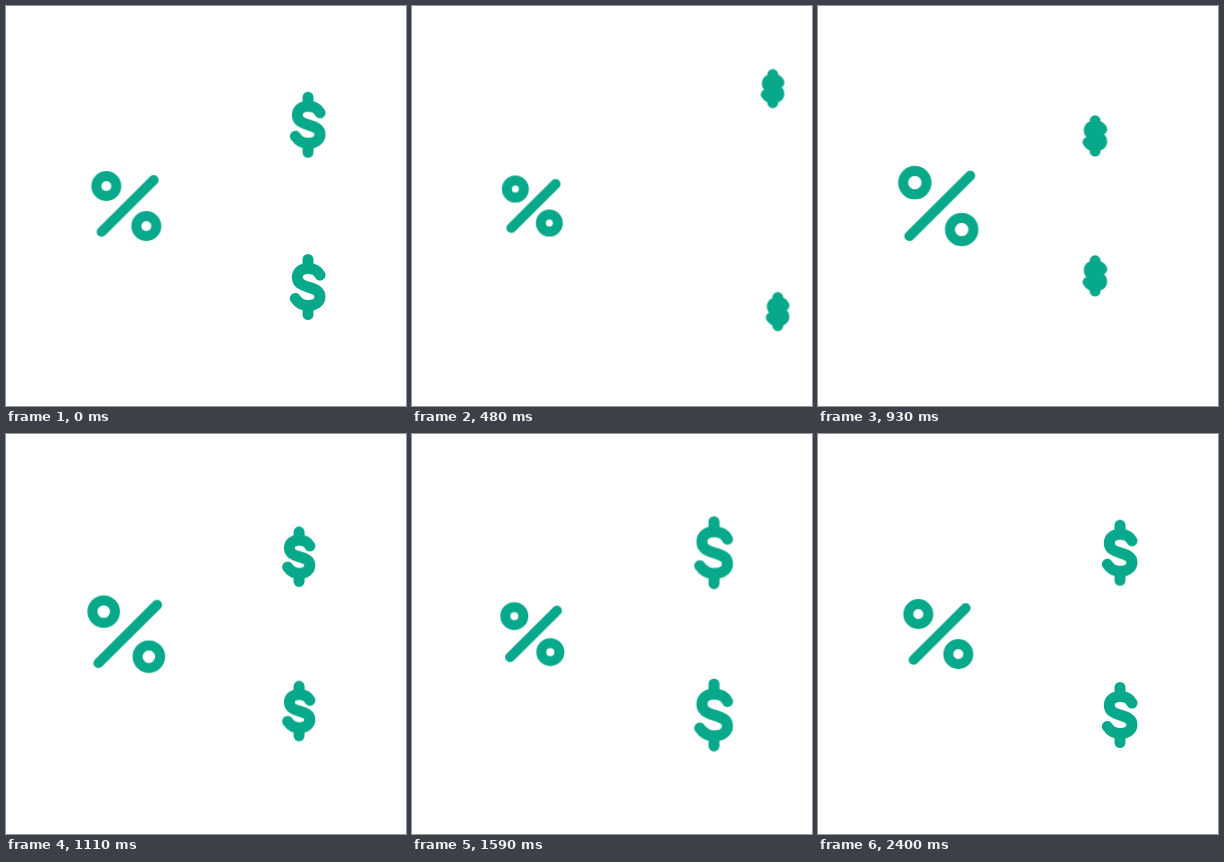
Animation of 400x400 px, one loop 4430 ms. Source, as an HTML page:

```html
<!DOCTYPE html>
<html lang="en">
<head>
<meta charset="utf-8">
<title>Percent and payouts</title>
<style>
html, body { margin: 0; width: 100%; height: 100%; overflow: hidden; background: #fff; }
svg { display: block; width: 100%; height: 100%; }

path {
  fill: none;
  stroke: #08a88a;
  stroke-width: 10px;
  stroke-linecap: round;
  stroke-linejoin: round;
  vector-effect: non-scaling-stroke;
}
.percent, .dollar, .fly {
  animation: 4430ms cubic-bezier(.333, 0, .667, 1) infinite;
}
.percent { animation-name: pulse; }
.fly { animation-name: fly; }
.dollar {
  animation-name: bounce;
  stroke-width: 11px;
  d: path("M0-27.5V-18.5M0 18.5V27.5M12-12C10-16 6-18.5 0-18.5C-6.5-18.5-10.7-15-10.7-9.7C-10.7-4-6.5-2 0 0C7 2 12 4 12 9.5C12 15 7 18.5 0 18.5C-6 18.5-10 15.5-12.7 11.5");
}

/* exit offset (--ox, --oy) and entry offset (--ix, --iy) */
.top { --ox: 73.5px; --oy: -45.2px; --ix: -134.5px; --iy: 60.5px; }
.bottom { --ox: 79.8px; --oy: 30.8px; --ix: -134.5px; --iy: -60.1px; }

@keyframes pulse {
  0% { transform: scale(1); }
  10.84% { transform: scale(.85); }
  22.12% { transform: scale(1.18); }
  33.41% { transform: scale(.88); }
  42.89%, 100% { transform: scale(1); }
}
@keyframes bounce {
  0% { transform: scale(1); }
  14.45%, 17.61% { transform: scale(.42); }
  31.15% { transform: scale(1.25); }
  44.7% { transform: scale(.82); }
  54.18%, 100% { transform: scale(1); }
}
/* accelerate outwards, reappear at the percent sign, glide home */
@keyframes fly {
  0% { transform: translate(0, 0); animation-timing-function: cubic-bezier(.333, 0, .667, .333); }
  12.144% { transform: translate(var(--ox), var(--oy)); animation-timing-function: step-end; }
  12.15% { transform: translate(var(--ix), var(--iy)); animation-timing-function: cubic-bezier(.25, 1, .5, 1); }
  38.06%, 100% { transform: translate(0, 0); }
}
</style>
</head>
<body>
<svg viewBox="0 0 400 400">
  <g transform="translate(302 118.7)"><g class="fly top"><path class="dollar"/></g></g>
  <g transform="translate(302 281)"><g class="fly bottom"><path class="dollar"/></g></g>
  <g transform="translate(120.6 200.1)">
    <path class="percent" d="M-25 25.7L27-26
      M-30.3-20a10 10 0 1 1 20 0a10 10 0 1 1-20 0z
      M9.7 20a10 10 0 1 1 20 0a10 10 0 1 1-20 0z"/>
  </g>
</svg>
</body>
</html>
```
